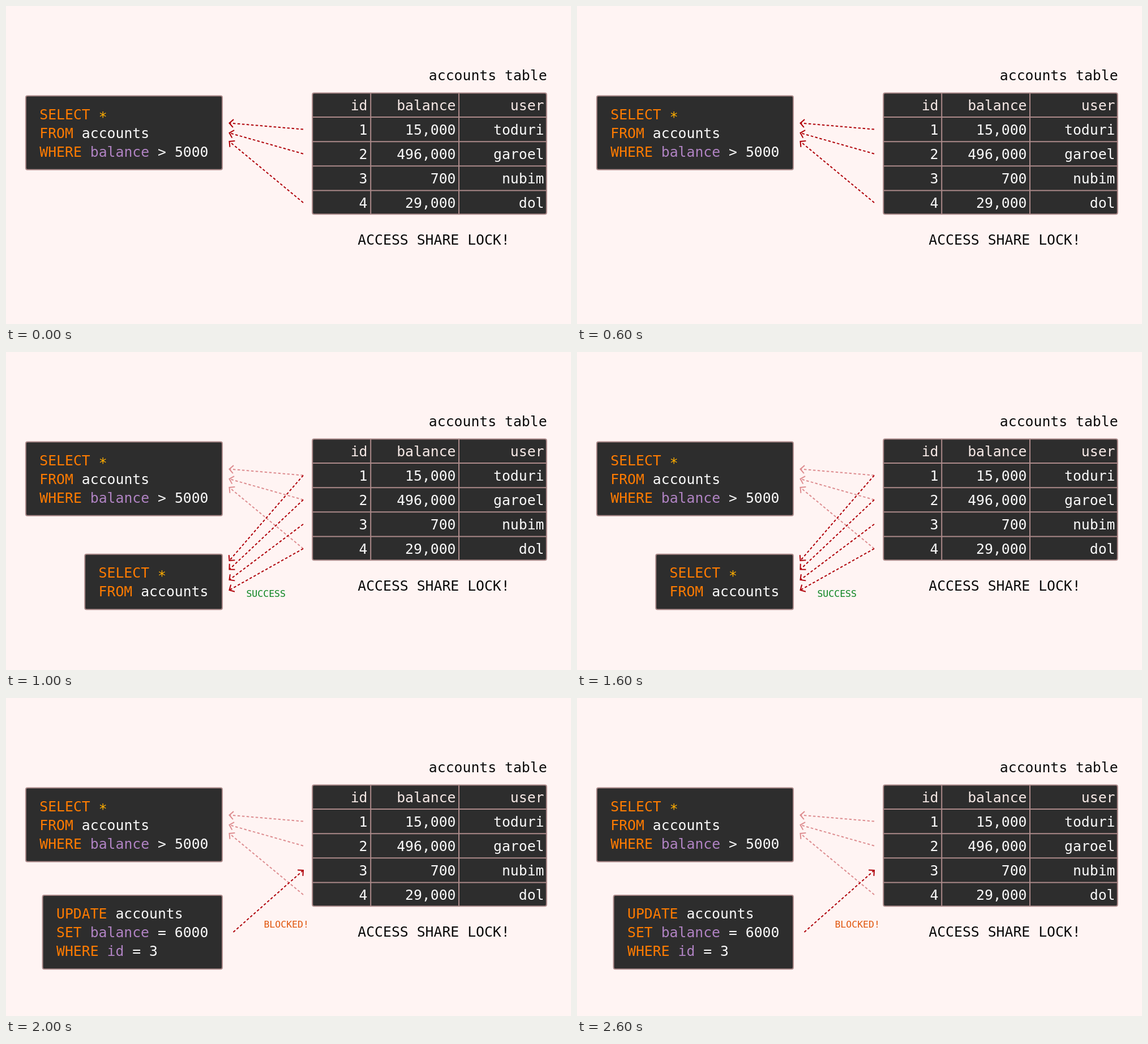
An HTML page for the animation above (3 s loop, 998x561 px).

```html
<!DOCTYPE html>
<html lang="en">
<head>
<meta charset="utf-8">
<style>
  html, body { margin: 0; height: 100%; overflow: hidden; background: #fff4f3; }
  svg { display: block; width: 998px; height: 561px; }
  text { font: 24.78px "DejaVu Sans Mono", monospace; fill: #fafafa; white-space: pre; }
  .note { font-size: 16.5px; }
  .dark { fill: #0a0a0a; }
  .head { fill: #f6e9e6; }
  .key { fill: #ff7b00; }
  .col { fill: #b083c3; }
  .star { fill: #ffae00; }
  .box { fill: #2d2d2d; stroke: #ac8a8a; stroke-width: 2; }
  .rule { stroke: #ac8a8a; stroke-width: 2; }
  .arrow { fill: none; stroke: #b00009; stroke-width: 2; }
</style>
</head>
<body>
<svg id="stage" viewBox="0 0 998 561"></svg>
<script>
const STEP = 1000;
const LINE = 32.8;
const ROW = 43.1;

const text = (x, y, s, cls = "", anchor = "start") =>
  `<text x="${x}" y="${y}" class="${cls}" text-anchor="${anchor}">${s}</text>`;

const box = (x, y, w, h) =>
  `<rect class="box" x="${x}" y="${y}" width="${w}" height="${h}" rx="3"/>`;

const rule = (x1, y1, x2, y2) =>
  `<line class="rule" x1="${x1}" y1="${y1}" x2="${x2}" y2="${y2}"/>`;

const highlight = s => s
  .replace(/\b[A-Z]+\b/g, '<tspan class="key">$&</tspan>')
  .replace(/\b(balance|id)\b/g, '<tspan class="col">$&</tspan>')
  .replace("*", '<tspan class="star" dy="4.5">*</tspan>');

// Query panels share their right edge and grow to the left.
function query(left, top, lines) {
  const height = lines.length * LINE + 31.8;
  return box(left, top, 382 - left, height) + lines.map((s, i) =>
    text(left + 24.4, top + 41.3 + i * LINE, highlight(s.replace(">", "&gt;")))).join("");
}

function arrow(x1, y1, x2, y2) {
  const angle = Math.atan2(y2 - y1, x2 - x1) * 180 / Math.PI;
  const length = Math.hypot(x2 - x1, y2 - y1);
  return `<g class="arrow" transform="translate(${x2} ${y2}) rotate(${angle})">
    <path d="M${-length} 0H0" stroke-dasharray="4.5 3.5"/>
    <path d="M-7 -7L0 0L-7 7"/></g>`;
}

const rowY = id => 217.6 + (id - 1) * ROW;
const read = (id, y) => arrow(525, rowY(id), 394.5, y);

function table() {
  const rows = [
    ["id", "balance", "user"],
    ["1", "15,000", "toduri"],
    ["2", "496,000", "garoel"],
    ["3", "700", "nubim"],
    ["4", "29,000", "dol"]
  ];
  const ends = [638.5, 794.5, 950.5];
  let out = box(541.2, 153.6, 413.6, 213.6);
  for (const x of [644.2, 800]) out += rule(x, 153.6, x, 367.2);
  rows.forEach((cells, r) => {
    if (r) out += rule(541.2, 153 + r * ROW, 954.8, 153 + r * ROW);
    cells.forEach((s, c) => out += text(ends[c], 184 + r * ROW, s, r ? "" : "head", "end"));
  });
  return out;
}

const scenes = [
  "",
  query(139.2, 356.8, ["SELECT *", "FROM accounts"]) +
    read(1, 368) + read(2, 383.5) + read(3, 402) + read(4, 420) +
    `<g style="fill:#0a8520">${text(424.4, 432, "SUCCESS", "note").replace("<text", '<text style="fill:inherit"')}</g>`,
  query(64.6, 348, ["UPDATE accounts", "SET balance = 6000", "WHERE id = 3"]) +
    arrow(401.5, 413, 525, 304) +
    `<g style="fill:#e0560d">${text(455.4, 404.5, "BLOCKED!", "note").replace("<text", '<text style="fill:inherit"')}</g>`
];

document.getElementById("stage").innerHTML =
  query(34.9, 158.6, ["SELECT *", "FROM accounts", "WHERE balance > 5000"]) +
  text(955.6, 130.5, "accounts table", "dark", "end") + table() +
  text(755.5, 421, "ACCESS SHARE LOCK!", "dark", "middle") +
  `<g id="reads">${read(1, 206.5)}${read(2, 224)}${read(4, 239)}</g>` +
  scenes.map(s => `<g class="scene">${s}</g>`).join("");

const reads = document.getElementById("reads");
const groups = document.querySelectorAll(".scene");

function draw() {
  const step = Math.floor(performance.now() / STEP) % scenes.length;
  reads.setAttribute("opacity", step ? 0.42 : 1);
  groups.forEach((g, i) => g.setAttribute("visibility", i === step ? "visible" : "hidden"));
  requestAnimationFrame(draw);
}
draw();
</script>
</body>
</html>
```
